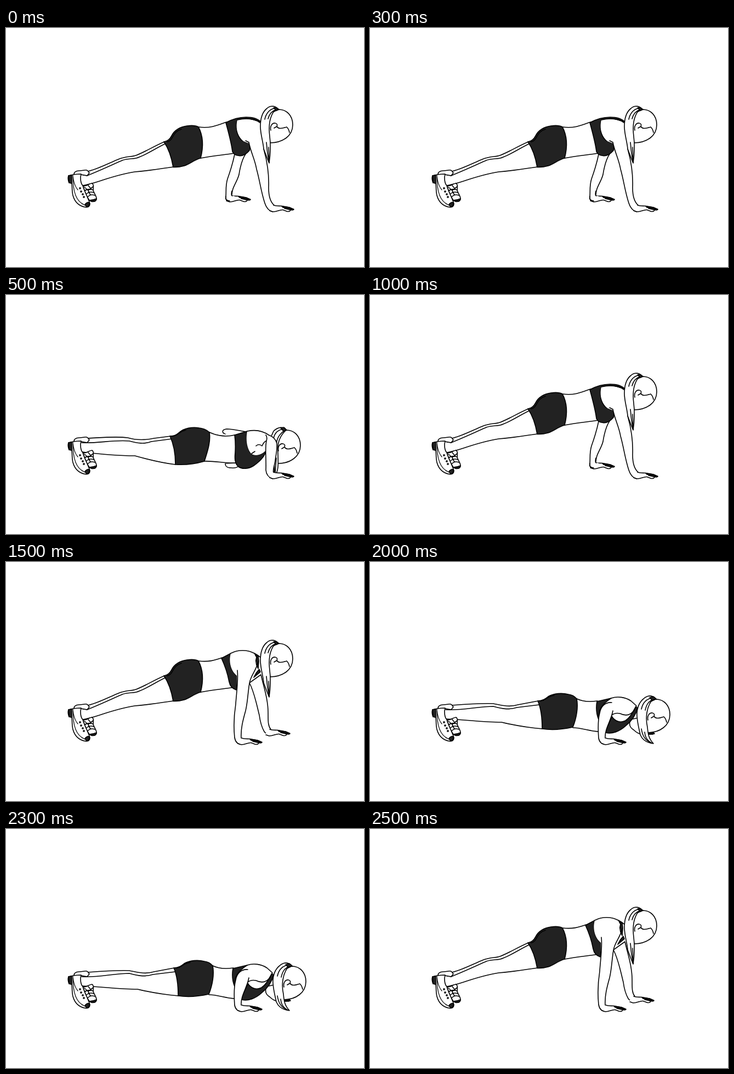
An HTML page for the animation above (3 s loop, 653 by 437 pixels).

```html
<!DOCTYPE html>
<html lang="en">
<head>
<meta charset="utf-8">
<title>Push-up</title>
<style>
  html, body { margin: 0; width: 100%; height: 100%; overflow: hidden; background: #fff; }
  svg { display: block; width: 100vw; height: 100vh; }
  path { stroke: #000; stroke-width: 1.6; stroke-linecap: round; stroke-linejoin: round; }
  .line { fill: none; }
  .skin { fill: #fff; }
  .skin.bare { stroke: none; }
  .dark { fill: #222; }
  .thin { fill: none; stroke-width: 1.2; }
</style>
</head>
<body>
<svg id="stage" viewBox="0 0 653 437"></svg>
<script>
const stage = document.getElementById('stage');

const path = (cls, d) => `<path class="${cls}" d="${d}"/>`;
const line = d => path('line', d);
const thin = d => path('thin', d);
const skin = d => path('skin', d);
const bare = d => path('skin bare', d);
const dark = d => path('dark', d);
const move = (x, y, body) => `<g transform="translate(${x} ${y})">${body}</g>`;

const hand = (x, y) => move(x, y,
  bare('M488 324L503 326L525 331L516 335L506 332L487 336L480 332Z') +
  line('M488 324C493 326 498 325 503 325.5L517 328L525 331.5Q525 333.5 519 332.5L508 330M519 333Q518 336 513 335.5L505 332.5C499 332 495 336 487 336L481 334') +
  dark('M503 326L516 328L524 331.5L518 331.5L505 328Z'));

const shoes =
  skin('M124 268C124 263 128 261 134 261C141 261 146 258 149 261L152 265L148 270L137 268Z') +
  skin('M140 288C146 291 151 284 157 284C161 286 159 292 159 297C161 303 166 309 165 313C164 318 156 318 152 315C146 307 143 298 140 288Z') +
  line('M143 291L150 297L159 290M143 298Q149 293 159 296M146 304Q152 298 160 301M149 309Q154 303 162 306M150 288L155 294M150 298L154 305') +
  dark('M152 315Q159 315 165 312Q164 318 157 317.5Z') +
  skin('M114 270C121 268 130 267 137 267C135 274 136 284 140 288C143 299 150 311 153 321C153 327 149 328 144 327.5C132 325 125 317 122 306C120 297 121 290 120 284L115 283C113 278 113 273 114 270Z') +
  dark('M114 270L120 269L120 284L115 283Z') +
  thin('M122 269C122 282 123 296 127 306Q132 319 144 324M122 270C123 281 126 290 131 296') +
  dark('M144 323Q147 318 152 319Q153 327 147 327Z') +
  [[135, 293], [137, 299], [140, 304], [142, 309]]
    .map(([x, y]) => `<circle cx="${x}" cy="${y}" r="2" fill="#222"/>`).join('');

const face =
  skin('M497 149C512 149 523 160 523 177C523 197 505 210 482 210L474 180L484 155Z') +
  line('M483 187C481 179 486 173 491 174Q496 175 494 180L489 183M494 180C497 185 503 184 512 181Q516 185 517 191');

const hair =
  skin('M497 149C491 142 483 141 476 147C467 154 464 168 464 180C464 194 469 208 470 221Q474 232 480 247C482 232 483 213 481 198C479 182 480 164 489 152Q492 149 497 149Z') +
  line('M489 147C480 149 474 157 472 167M493 149C484 152 480 158 478 166M475 209Q476 227 480 246M479 218L480 244') +
  dark('M488 146L493 145.5L498 149L493 151Z');

const legTop = 'M137 268L148 270C175 259 194 250 212 242C226 237 234 241 243 236C261 229 276 218 292 211';

const shortsUp =
  line('M150 262C172 256 186 248 205 240C220 234 229 236 237 233C255 226 270 216 289 208') +
  bare(legTop + 'L305 254L235 263C195 270 165 284 140 288Z') +
  line(legTop + 'M140 288C165 284 195 269 235 263C260 261 285 257 305 254') +
  dark('M288 208C295 207 299 203 302 197C307 187 317 181 330 179C338 178 346 178 351 181C359 196 361 215 355 238C343 241 335 249 325 252Q315 255 305 254.5C303 243 299 224 288 208Z') +
  line('M294 208C306 206 302 190 320 185');

const upBack = arm => arm + bare('M351 181C372 184 386 178 402 172L440 164L464 176L463 205L444 220L419 230L355 238Z');

const upLeft = () =>
  upBack(
    skin('M417 231C414 246 409 262 404 276C400 289 402 299 401 308C400 314 402 316 408 316L412 307C411 293 421 283 425 268C427 255 430 240 438 229Z') +
    hand(-79, -18) +
    bare('M404 300L411 300L411 306L418 308L418 314L404 314Z') +
    line('M401 308C400 313 402 316 408 316M412 298Q410 307 413 307')) +
  shortsUp +
  line('M351 181C372 184 386 178 402 172M355 238C376 234 397 232 416 229') +
  dark('M401 173C412 167 425 163 438 163C450 163 460 166 465 172L460 170C448 166 434 165 422 168C418 180 421 198 431 206L444 211Q446 218 444 224C439 230 431 235 425 233.5Q416 233 413 226C411 209 406 192 401 173Z') +
  bare('M422 168C442 163 462 170 466 180L470 222C476 242 480 267 479 292C479 306 481 317 489 324L485 334Q476 328 472 320C466 299 463 278 457 258C454 240 447 227 443 211L433 207C420 195 419 180 422 168Z') +
  line('M422 168C436 165 452 165 463 173M437 206L443 209C446 226 454 240 457 258C463 279 465 299 472 320Q476 333 486 336M470 221C476 242 480 267 479 292C479 306 481 317 489 324') +
  hand(0, 0) + face + hair;

const upRight = () =>
  upBack(
    skin('M444 221C453 238 457 260 462 280C464 295 467 303 471 310Q475 316 482 316L483 306C475 296 480 280 477 260C475 241 469 224 465 206Z') +
    hand(-7, -18)) +
  shortsUp +
  line('M351 181C370 183 380 180 394 175M355 238C376 234 397 232 416 229') +
  dark('M393 176L410 167C406 181 409 198 421 208C423 217 421 226 420 234Q409 230 407 219C404 203 399 189 393 176Z') +
  dark('M453 167L460 171L461 181L460 195L455 184L457 174Z') +
  dark('M462 196L464 201L452 211L457 202Z') +
  bare('M410 167C423 160 440 160 453 167L456 188C453 199 446 210 444 222C441 240 441 255 437 272C432 290 428 305 429 322L429 333Q419 333 417 321C415 301 416 279 419 260C420 241 422 224 421 208C409 198 406 181 410 167Z') +
  line('M410 167C423 160 440 160 453 167L464 174M460 182C457 198 446 207 444 222C441 240 441 255 437 272C432 290 428 305 429 322M422 198C424 217 420 242 419 260C416 279 415 301 417 321Q419 333 429 333') +
  hand(-58, -2) + face + hair;

const downLeft = () =>
  skin('M402 256L396 252Q393 246 403 245C414 245 425 248 438 250L420 260Z') +
  skin('M400 308C400 315 405 316 411 316Q420 317 424 313L419 307Z') +
  line('M149 262C171 261 201 258 222 261C239 266 256 265 270 262L301 258') +
  bare('M138 269L225 267L248 271L303 263L371 251L418 257L440 249L476 254L484 280L418 307L309 310L235 294L139 287Z') +
  line('M138 270C165 272 198 264 225 267C240 271 252 273 265 268L303 263M139 287C171 291 205 294 235 294C260 301 285 307 309 310') +
  dark('M299 258C306 258 311 256 315 252C325 243 340 241 352 243Q363 244 371 251C374 270 366 290 362 304C345 309 326 311 309 310C309 292 307 275 299 258Z') +
  line('M304 258C315 257 314 250 328 247M371 251C386 258 401 260 417 256M362 304C380 303 400 308 418 307') +
  move(14, 98, face) +
  skin('M511 247C506 240 496 241 488 249L484 258L488 326L493 326C499 315 495 291 496 277C497 264 502 255 511 247Z') +
  line('M505 245C492 248 487 257 488 270M508 248C497 255 493 264 493 276M489 302L490 325M493 298L491 325') +
  dark('M501 243L507 242L512 247L506 249Z') +
  dark('M417 256L440 249C437 264 439 280 447 290C455 296 467 292 474 284C473 295 462 305 452 312C443 318 431 319 424 314C417 308 417 299 418 288Q419 270 417 256Z') +
  bare('M440 249C454 246 468 248 480 256Q491 259 494 271C495 283 492 294 491 303C490 312 486 320 488 325L485 334Q476 329 475 320L474 284C467 292 455 296 447 290C439 280 437 264 440 249Z') +
  line('M440 249C454 246 468 248 479 256Q491 260 494 271C495 283 492 294 491 303C490 312 486 320 488 325M474 256Q477 260 475 267C472 280 475 302 474 320Q475 332 486 336M456 276Q461 271 467 276Q470 269 474 267M448 290L454 286') +
  hand(0, 0);

const downRight = () =>
  line('M149 262C176 260 205 258 225 259C240 262 254 266 270 261L307 254') +
  bare('M138 269L225 264L250 269L309 261L377 250L415 254L440 249L476 254L486 264L460 300L416 310L314 305L240 293L139 287Z') +
  line('M138 270C167 272 198 264 225 264C240 268 252 271 268 266L309 261M139 287C171 288 205 293 240 293C265 299 290 303 314 305') +
  dark('M306 254C315 254 320 250 325 246C335 240 350 239 362 242Q371 243 377 250C380 265 377 285 370 302C352 306 332 308 314 305C314 288 313 270 306 254Z') +
  line('M311 254C322 253 321 246 336 244M377 250C389 256 401 256 415 254M370 303C385 303 400 309 416 310') +
  skin('M475 288C472 296 474 303 481 307C486 312 492 316 500 315L516 315Q520 313 515 311L494 309L489 285Z') +
  dark('M503 311L516 311L519 314L506 315Z') +
  dark('M414 255L440 249C429 256 421 263 418 274L417 288C413 278 412 266 414 255Z') +
  dark('M441 282C446 291 457 295 466 290C474 285 479 275 485 264L488 267C485 280 477 291 466 300C455 310 441 315 430 312C431 299 439 291 441 282Z') +
  bare('M441 257C429 256 421 264 419 276C415 291 416 308 417 322Q419 333 429 333L429 322C428 306 438 292 443 274Z') +
  line('M440 249C451 245 466 247 476 254L486 263M441 257C429 256 421 264 419 276C415 291 416 308 417 322Q419 333 429 333M443 272C440 290 428 304 429 322M441 280Q447 275 456 277Q472 285 482 271') +
  hand(-58, -2) +
  move(24, 102, face) +
  skin('M521 250C514 243 506 244 499 250C490 257 486 270 487 282C488 296 491 306 493 316Q499 330 517 332C508 323 507 313 506 302C502 284 505 265 514 253Z') +
  line('M512 249C502 252 497 259 495 269M517 251C507 255 504 262 502 271M495 305Q498 326 514 331M501 311Q502 324 512 330') +
  dark('M510 248L517 246L522 250L515 253Z');

const poses = [upLeft, downLeft, upRight, downRight]
  .map(draw => `<g visibility="hidden">${draw()}</g>`);
stage.innerHTML = poses.join('') + shoes;

const groups = [...stage.children].slice(0, poses.length);
const order = [0, 1, 0, 2, 3, 2];
const HOLD = 500;

function render(ms) {
  const current = order[Math.floor(ms / HOLD) % order.length];
  groups.forEach((g, i) => g.setAttribute('visibility', i === current ? 'visible' : 'hidden'));
}

const start = performance.now();
function tick() {
  render(performance.now() - start);
  requestAnimationFrame(tick);
}
tick();
</script>
</body>
</html>
```
